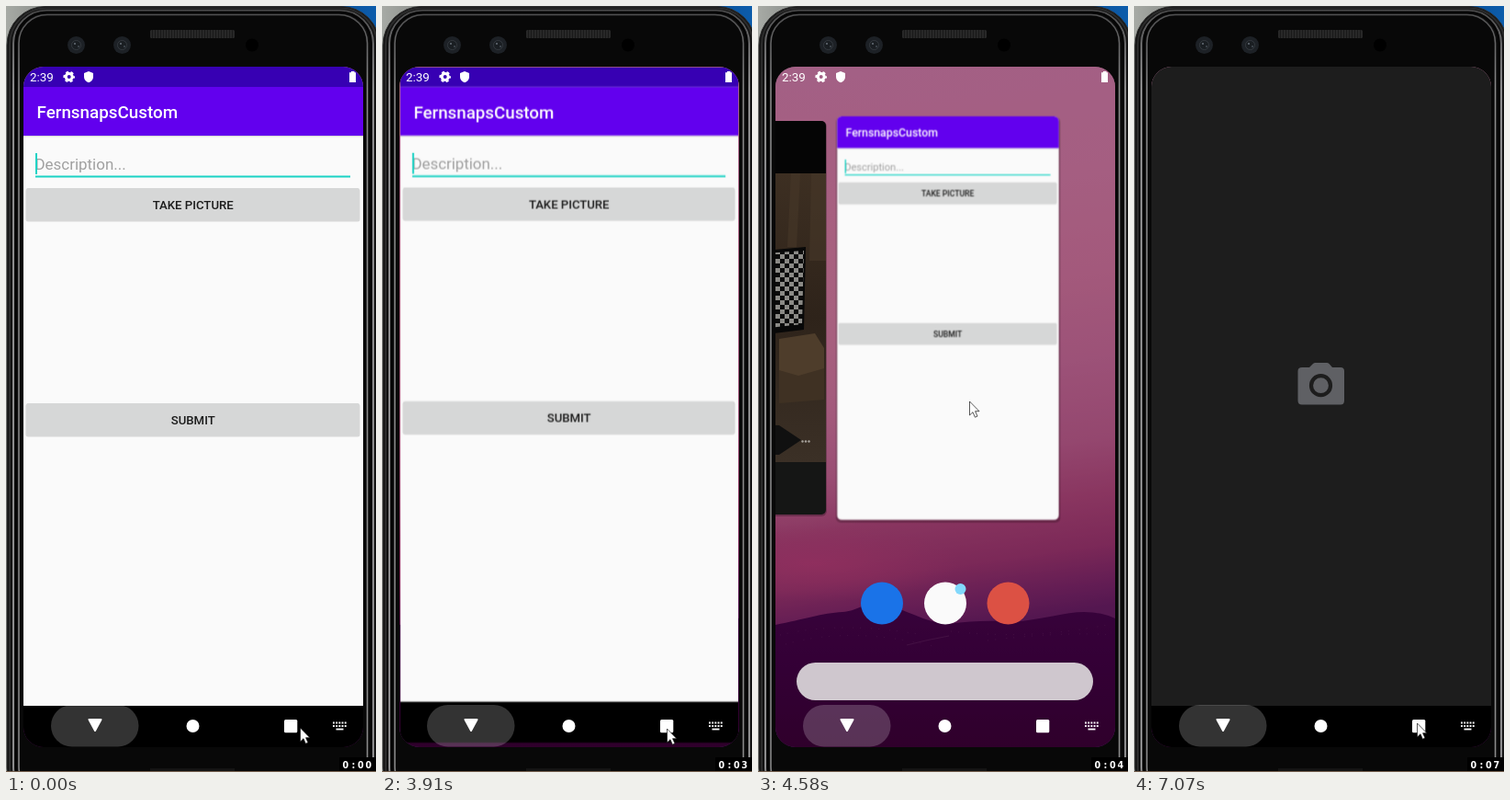
Write an HTML page that moves like this. It is 403 by 833 pixels and loops after 8000 ms.

```html
<!DOCTYPE html>
<html lang="en">
<head>
<meta charset="utf-8">
<title>Phone recents demo</title>
<style>
html, body { margin: 0; width: 100%; height: 100%; overflow: hidden; background: #080808; }
svg { display: block; width: 100%; height: 100%; }
text { font-family: Roboto, sans-serif; }
.medium { font-weight: 500; }
.label { font-size: 13.2px; font-weight: 500; text-anchor: middle; fill: #1c1c1c; }
.clock { font: bold 9.6px "DejaVu Sans", sans-serif; fill: #fff; }

/* Every state change is a hard cut; percentages are ms / 80. */
.caret, .window, .card, .previous, .dim, .dock, .badge, .launch, .camera, .lens,
.status, .nav, .digits, .pointer { animation: 8s step-end infinite; }

.caret { animation-name: caret; }
@keyframes caret { 0% { opacity: 1 } 7% { opacity: 0 } 12.375% { opacity: 1 } }

.window { animation-name: window; }
@keyframes window {
  0% { opacity: 1; transform: none }
  48.875% { opacity: 1; transform: translate(1.1px, .8px) scale(.9946, .993) }
  50.375% { opacity: 0; transform: none }
}

.card { animation-name: card; }
@keyframes card {
  0% { opacity: 0; transform: none }
  51.625% { opacity: 1; transform: translate(53px, 41px) scale(.74) }
  53.5% { opacity: 1; transform: translate(70.6px, 62.5px) scale(.653) }
  57.25% { opacity: 1; transform: translate(73.6px, 62.5px) scale(.653) }
  59.125% { opacity: 0; transform: none }
}

.previous { animation-name: previous; }
@keyframes previous {
  0% { opacity: 0; transform: none }
  51.625% { opacity: 1; transform: translateX(-28px) }
  53.5% { opacity: 1; transform: none }
  57.25% { opacity: 1; transform: translateX(4px) }
  59.125% { opacity: 0; transform: none }
}

.dim { animation-name: dim; }
@keyframes dim { 0% { opacity: .45 } 50.375% { opacity: 0 } 51.625% { opacity: .3 } 53.5% { opacity: .45 } }

.dock { animation-name: dock; }
@keyframes dock {
  0% { opacity: 0; transform: none }
  51.625% { opacity: .6; transform: translateY(14px) }
  53.5% { opacity: 1; transform: none }
  59.125% { opacity: 0; transform: none }
}

.badge { animation-name: badge; }
@keyframes badge { 0% { opacity: 0 } 55.375% { opacity: 1 } 57.25% { opacity: 0 } }

.launch { animation-name: launch; }
@keyframes launch { 0% { opacity: 0 } 59.125% { opacity: 1 } 60.625% { opacity: 0 } }

.camera { animation-name: camera; }
@keyframes camera { 0% { opacity: 0 } 60.625% { opacity: 1 } }

.lens { animation-name: lens; }
@keyframes lens { 0% { opacity: 0 } 67.875% { opacity: .5 } 69.375% { opacity: 1 } }

.status { animation-name: status; }
@keyframes status {
  0% { opacity: 1; transform: none }
  50.375% { opacity: 0; transform: none }
  51.625% { opacity: 1; transform: none }
  59.125% { opacity: 1; transform: translateY(-7px) }
  60.625% { opacity: 0; transform: none }
}

.nav { animation-name: nav; }
@keyframes nav { 0% { opacity: 1 } 50.375% { opacity: 0 } 51.625% { opacity: 1 } }

.digits { animation-name: digits; }
@keyframes digits {
  0% { transform: none }
  10.875% { transform: translateY(-20px) }
  23.25% { transform: translateY(-40px) }
  37.125% { transform: translateY(-60px) }
  51.625% { transform: translateY(-80px) }
  62.5% { transform: translateY(-100px) }
  74.625% { transform: translateY(-120px) }
  88.375% { transform: translateY(-140px) }
}

.pointer { animation-name: pointer; }
@keyframes pointer {
  0% { transform: translate(320px, 785px) }
  31.5% { transform: translate(322px, 785px) }
  33.375% { transform: translate(320px, 786px) }
  35.25% { transform: translate(312px, 785px) }
  37.125% { transform: translate(311px, 785px) }
  38.375% { transform: translate(310px, 786px) }
  57.25% { transform: translate(230px, 430px) }
  66% { transform: translate(230px, 431px) }
  67.875% { transform: translate(299px, 796px) }
  71.25% { transform: translate(300px, 783px) }
  73.125% { transform: translate(308px, 780px) }
}
</style>
</head>
<body>
<svg viewBox="0 0 403 833" preserveAspectRatio="none">
  <defs>
    <clipPath id="screen"><rect x="19" y="66" width="370" height="740" rx="22"/></clipPath>
    <clipPath id="cardShape"><rect x="19" y="88" width="370" height="672" rx="8"/></clipPath>
    <clipPath id="previousShape"><rect x="-172" y="125" width="242" height="428" rx="5"/></clipPath>
    <clipPath id="timerShape"><rect x="363" y="817" width="40" height="15"/></clipPath>
    <linearGradient id="sky" gradientUnits="userSpaceOnUse" x1="160" y1="66" x2="245" y2="672">
      <stop offset="0" stop-color="#f1aed2"/>
      <stop offset=".22" stop-color="#f4abcb"/>
      <stop offset=".4" stop-color="#f1a2c1"/>
      <stop offset=".56" stop-color="#e494ba"/>
      <stop offset=".7" stop-color="#d681aa"/>
      <stop offset=".8" stop-color="#c2618f"/>
      <stop offset=".89" stop-color="#a94a80"/>
      <stop offset=".95" stop-color="#82377a"/>
      <stop offset="1" stop-color="#622a73"/>
    </linearGradient>
    <radialGradient id="glow" gradientUnits="userSpaceOnUse" cx="20" cy="330" r="250">
      <stop offset="0" stop-color="#fcb5c9" stop-opacity=".9"/>
      <stop offset=".5" stop-color="#fab0c8" stop-opacity=".6"/>
      <stop offset="1" stop-color="#f5a8c4" stop-opacity="0"/>
    </radialGradient>
    <radialGradient id="ember">
      <stop offset="0" stop-color="#d2558c" stop-opacity=".8"/>
      <stop offset="1" stop-color="#c9548a" stop-opacity="0"/>
    </radialGradient>
    <linearGradient id="hills" x2="0" y2="1">
      <stop offset="0" stop-color="#2f064c"/>
      <stop offset=".45" stop-color="#270042"/>
      <stop offset="1" stop-color="#200030"/>
    </linearGradient>
    <linearGradient id="room" x2="0" y2="1">
      <stop offset="0" stop-color="#3d2f22"/>
      <stop offset=".5" stop-color="#2e231a"/>
      <stop offset="1" stop-color="#3b3026"/>
    </linearGradient>
    <linearGradient id="corner" x2="1">
      <stop offset="0" stop-color="#a7aaa5"/>
      <stop offset=".1" stop-color="#8d908c"/>
      <stop offset=".85" stop-color="#0d4f92"/>
      <stop offset="1" stop-color="#0c5cab"/>
    </linearGradient>
    <linearGradient id="rim" gradientUnits="userSpaceOnUse" x1="0" y1="0" x2="0" y2="90">
      <stop offset="0" stop-color="#4a4a4b"/>
      <stop offset="1" stop-color="#8c8c8d"/>
    </linearGradient>
    <pattern id="checks" width="10" height="10" patternUnits="userSpaceOnUse">
      <path fill="#0b0b0b" d="M0 0h10v10H0z"/>
      <path fill="#8b8a86" d="M0 0h5v5H0zM5 5h5v5H5z"/>
    </pattern>
    <pattern id="mesh" width="3" height="3" patternUnits="userSpaceOnUse">
      <path fill="#282828" d="M0 0h3v3H0z"/><path fill="#191919" d="M0 0h1v3H0z"/>
    </pattern>
  </defs>

  <!-- Handset -->
  <rect width="403" height="833" fill="url(#corner)"/>
  <g fill="none">
    <rect x="1" y=".5" width="406" height="870" rx="42" fill="#121212" stroke="#2e2e2e"/>
    <rect x="4" y="2.500" width="400" height="864" rx="39" stroke="#2b2b2b" stroke-width="2"/>
    <rect x="8" y="5" width="392" height="858" rx="36" stroke="url(#rim)" stroke-width="2"/>
    <rect x="11" y="7" width="386" height="854" rx="33" stroke="#060606" stroke-width="3"/>
    <rect x="14" y="9.500" width="379.500" height="849" rx="31" fill="#080808" stroke="url(#rim)" stroke-width="1.500"/>
  </g>
  <rect x="157" y="26" width="92" height="9" rx="1.5" fill="url(#mesh)"/>
  <rect x="157" y="829" width="92" height="3" fill="#141414"/>
  <path fill="#75604f" d="M0 832h403v1H0z"/>
  <g id="sensor">
    <circle cx="76.5" cy="42.5" r="9.5" fill="#1d2126"/>
    <circle cx="76.5" cy="42.5" r="5" fill="#1a1e22" stroke="#34393f"/>
    <circle cx="75" cy="41" r="1" fill="#68717a"/><circle cx="79" cy="44" r="1" fill="#464e56"/>
  </g>
  <use href="#sensor" x="50"/>
  <circle cx="268" cy="42.500" r="7" fill="#000"/>

  <g clip-path="url(#screen)">
    <!-- Wallpaper -->
    <path fill="url(#sky)" d="M19 66h370v740H19z"/>
    <path fill="url(#glow)" d="M19 66h270v530H19z"/>
    <ellipse cx="60" cy="606" rx="160" ry="42" fill="url(#ember)"/>
    <path fill="url(#hills)" d="M19 673C50 667 70 660 92 659C108 658 112 650.500 128 650C146 650 158 658 170 662Q190 671 208 672C235 668 260 668 277 670C310 667 335 659 355 659Q375 659 389 666V806H19z"/>
    <path fill="none" stroke="#563369" stroke-width="1" opacity=".6" d="M162 695Q185 689 208 685"/>
    <path fill="none" stroke="#644276" stroke-width="1" stroke-dasharray="1 7 1 11" opacity=".45" d="M24 684Q90 668 180 684M30 694Q100 674 190 696M210 680Q300 690 385 672M250 690Q330 680 388 684"/>
    <path class="dim" fill="#440028" d="M19 66h370v740H19z"/>

    <!-- Recents -->
    <g class="dock">
      <circle cx="135" cy="649.500" r="23" fill="#1a73e8"/>
      <circle cx="204" cy="649.500" r="23" fill="#fafafa"/>
      <circle cx="220.500" cy="634" r="6" fill="#82d8fb"/>
      <circle cx="272.500" cy="649.500" r="23" fill="#dc5144"/>
      <rect x="42" y="714" width="323" height="41" rx="20.500" fill="#cfc7ce"/>
    </g>
    <g class="previous">
      <rect x="-172" y="125" width="243" height="430" rx="6" fill="#000" opacity=".25"/>
      <g clip-path="url(#previousShape)">
        <path fill="#050505" d="M-172 125H70V182H-172z"/>
        <path fill="url(#room)" d="M-172 182H70V496H-172z"/>
        <path fill="#463728" d="M32 182h10L38 262H28zM54 182h16v95H52z" opacity=".6"/>
        <path fill="#080808" d="M-20 268L48 262L46 352L-20 360z"/>
        <path fill="url(#checks)" d="M-10 270L46 266L44 346L-10 352z"/>
        <path fill="#4e3d2b" d="M19 362L58 356L68 372V396L40 404L19 398z"/>
        <path fill="#3f3123" d="M19 396L40 402L68 394V428L19 432z"/>
        <path fill="#101010" d="M-10 455L19 456L43 472L19 488H-10z"/>
        <path fill="#151615" d="M-172 496H70V553H-172z"/>
        <g fill="#a7a29c"><circle cx="44.500" cy="473.500" r="1.200"/><circle cx="48" cy="473.500" r="1.200"/><circle cx="51.500" cy="473.500" r="1.200"/></g>
      </g>
    </g>
    <g class="card">
      <rect x="17" y="89" width="375" height="676" rx="9" fill="#000" opacity=".22"/>
      <g clip-path="url(#cardShape)"><use href="#page"/></g>
    </g>
    <circle class="badge" cx="204" cy="120" r="20.500" fill="#3ddc84"/>

    <!-- App window -->
    <g class="window">
      <path fill="#3700b3" d="M19 66h370v23H19z"/>
      <path d="M19 760h370v46H19z"/>
      <g id="page">
        <path fill="#fafafa" d="M19 88h370v673H19z"/>
        <path fill="#d9d9d9" d="M19 141h370v1.200H19z"/>
        <path fill="#6200ee" d="M19 88h370v53H19z"/>
        <text class="medium" x="33.500" y="122" font-size="18.840" fill="#fff">FernsnapsCustom</text>
        <text x="31.500" y="178" font-size="16.960" fill="#a0a0a0">Description...</text>
        <path fill="#1bd3c5" d="M32 184.500h343v2H32z"/>
        <path class="caret" fill="#1bd3c5" d="M32 160h2v23h-2z"/>
        <g id="button">
          <rect x="21.500" y="198.500" width="364" height="36" rx="2.500" fill="#000" opacity=".14"/>
          <rect x="22" y="198" width="363" height="35" rx="2" fill="#d6d7d7"/>
        </g>
        <use href="#button" y="234"/>
        <text class="label" x="203.700" y="221">TAKE PICTURE</text>
        <text class="label" x="203.700" y="455">SUBMIT</text>
      </g>
    </g>

    <!-- Camera app -->
    <g class="launch">
      <path fill="#1e1e1e" d="M19 69h353v682H19z"/>
      <path d="M19 751h353v40H19z"/>
    </g>
    <g class="camera">
      <path fill="#1d1d1d" d="M19 66h370v695H19z"/>
      <path d="M19 761h370v45H19z"/>
      <g class="lens">
        <path fill="#5f6064" d="M183 393H191L195 389Q196 388 197.500 388H210Q211.500 388 212.500 389L216 393H225Q229 393 229 397V429Q229 433.500 225 433.500H183Q178.500 433.500 178.500 429V397Q178.500 393 183 393z"/>
        <circle cx="203.500" cy="412.700" r="10.500" fill="none" stroke="#1d1d1d" stroke-width="4.200"/>
      </g>
    </g>

    <!-- System bars -->
    <g class="status" fill="#fff">
      <text x="26" y="82" font-size="13.400">2:39</text>
      <circle cx="68.700" cy="77" r="3.500" fill="none" stroke="#fff" stroke-width="3"/>
      <circle cx="68.700" cy="77" r="5.300" fill="none" stroke="#fff" stroke-width="2" stroke-dasharray="3 2.550" stroke-dashoffset="1.500"/>
      <path d="M90 71L95 73V77Q95 81.500 90 83.200Q85 81.500 85 77V73z"/>
      <path d="M376 71h3.500v1.300H381V83h-7V72.300h2z"/>
    </g>
    <g class="nav" fill="#fff">
      <rect x="49" y="760" width="95.500" height="45.500" rx="22.700" opacity=".2"/>
      <path stroke="#fff" stroke-width="2" stroke-linejoin="round" d="M90.500 776h13L97 788z"/>
      <circle cx="203.500" cy="783" r="7"/>
      <rect x="303" y="776" width="14.300" height="14.300" rx="1.500"/>
      <path fill="none" stroke="#fff" stroke-width="1.900" stroke-dasharray="1.900 1.300" d="M356 779.500h15M356 783h15"/>
      <path d="M359.500 785.600h8v1.800h-8z"/>
    </g>
  </g>

  <!-- Recording clock -->
  <path d="M363 817h40v15h-40z"/>
  <g clip-path="url(#timerShape)">
    <text class="clock" x="366.500 376.500 383" y="828.500">0:0</text>
    <g class="digits" id="digits"></g>
  </g>

  <path class="pointer" fill="#fff" stroke="#111" stroke-width=".7" d="M.5 0V15L4 11.700L6.400 17.200L9 16.100L6.600 10.700H11z"/>
</svg>
<script>
const digits = document.getElementById("digits");
for (let second = 0; second < 8; second++) {
  const label = document.createElementNS(digits.namespaceURI, "text");
  label.setAttribute("class", "clock");
  label.setAttribute("x", 391.5);
  label.setAttribute("y", 828.5 + second * 20);
  label.textContent = second;
  digits.append(label);
}
</script>
</body>
</html>
```
